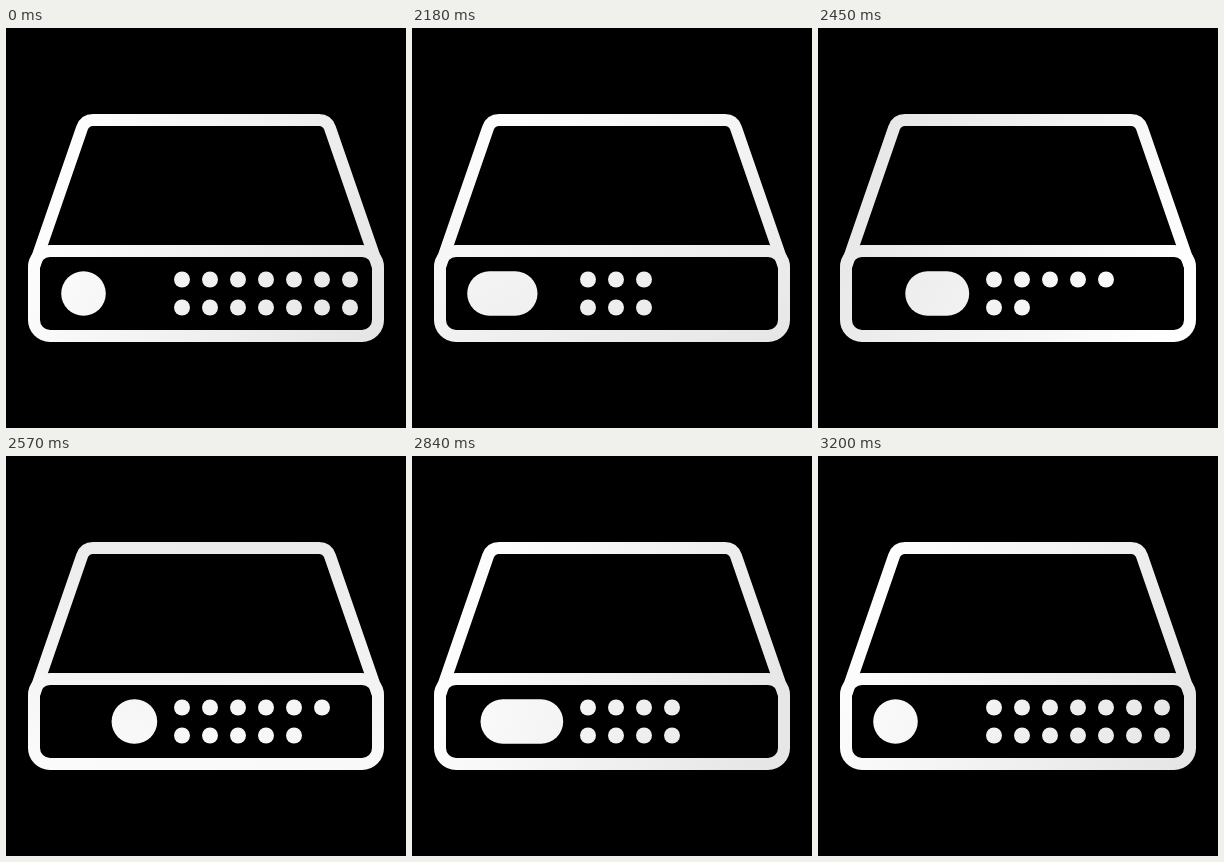
An HTML page that plays this animation: 400 px wide and 400 px high, repeating every 3.23 s.

```html
<!DOCTYPE html>
<html lang="en">
<head>
<meta charset="utf-8">
<title>Server box</title>
<style>
  html, body { margin: 0; width: 100%; height: 100%; overflow: hidden; background: #000; }
  svg { display: block; width: 100%; height: 100%; }
</style>
</head>
<body>
<svg viewBox="0 0 400 400">
  <defs>
    <linearGradient id="shade" gradientUnits="userSpaceOnUse">
      <stop offset="0" stop-color="#fff"/>
      <stop offset="1" stop-color="#e6e6e6"/>
    </linearGradient>
  </defs>
  <g fill="none" stroke="url(#shade)" stroke-width="12">
    <path d="M28 239L76 100Q79 92 87 92H313Q321 92 324 100L372 239"/>
    <rect x="28" y="223" width="344" height="85" rx="16"/>
  </g>
  <g id="lights" fill="url(#shade)">
    <rect id="knob" y="243.2" height="44.6" rx="22.3"/>
  </g>
</svg>
<script>
const LOOP = 3230, START = 2000, SPAN = 1200, STEP = 30;
const COLS = 7, GAP = 28;
const LEFT = 55.2, SIZE = 44.6, TRAVEL = 51.4;

// Lit share of each row: [progress, level]
const levels = [
  [[0, 1], [0.2, 0.25], [0.5, 1], [0.7, 0.5], [1, 1]],
  [[0, 1], [0.27, 0.05], [0.6, 1], [0.75, 0.4], [1, 1]]
];

const shade = document.getElementById('shade');
const knob = document.getElementById('knob');
const lights = document.getElementById('lights');

function set(el, attrs) {
  for (const key in attrs) el.setAttribute(key, attrs[key]);
}

function addDot(col, row) {
  const dot = document.createElementNS('http://www.w3.org/2000/svg', 'circle');
  set(dot, { cx: 176 + col * GAP, cy: 251.5 + row * GAP, r: 8 });
  lights.appendChild(dot);
  return dot;
}

const rows = levels.map((_, row) =>
  Array.from({ length: COLS }, (_, col) => addDot(col, row)));

function ease(u, from, to) {
  const k = Math.min(1, Math.max(0, (u - from) / (to - from)));
  return k * k * (3 - 2 * k);
}

function levelAt(keys, u) {
  const i = Math.max(1, keys.findIndex(key => key[0] >= u));
  const [u0, v0] = keys[i - 1], [u1, v1] = keys[i];
  return v0 + (v1 - v0) * ease(u, u0, u1);
}

function draw(ms) {
  const tick = Math.floor((ms % LOOP - START) / STEP) * STEP;
  const u = Math.min(1, Math.max(0, tick / SPAN));

  // The leading edge stretches the knob, the other one catches up
  const right = ease(u, 0, 0.3) - ease(u, 0.7, 1);
  const left = ease(u, 0.2, 0.5) - ease(u, 0.5, 0.8);
  set(knob, { x: LEFT + TRAVEL * left, width: SIZE + TRAVEL * (right - left) });

  rows.forEach((dots, row) => {
    const lit = Math.floor(levelAt(levels[row], u) * (COLS - 1)) + 1;
    dots.forEach((dot, col) => set(dot, { visibility: col < lit ? 'visible' : 'hidden' }));
  });

  const angle = (25 + 360 * ease(u, 0, 0.75)) * Math.PI / 180;
  const dx = 185 * Math.cos(angle), dy = 185 * Math.sin(angle);
  set(shade, { x1: 200 - dx, y1: 200 - dy, x2: 200 + dx, y2: 200 + dy });
}

const begin = performance.now();
function loop() {
  draw(performance.now() - begin);
  requestAnimationFrame(loop);
}
loop();
</script>
</body>
</html>
```
